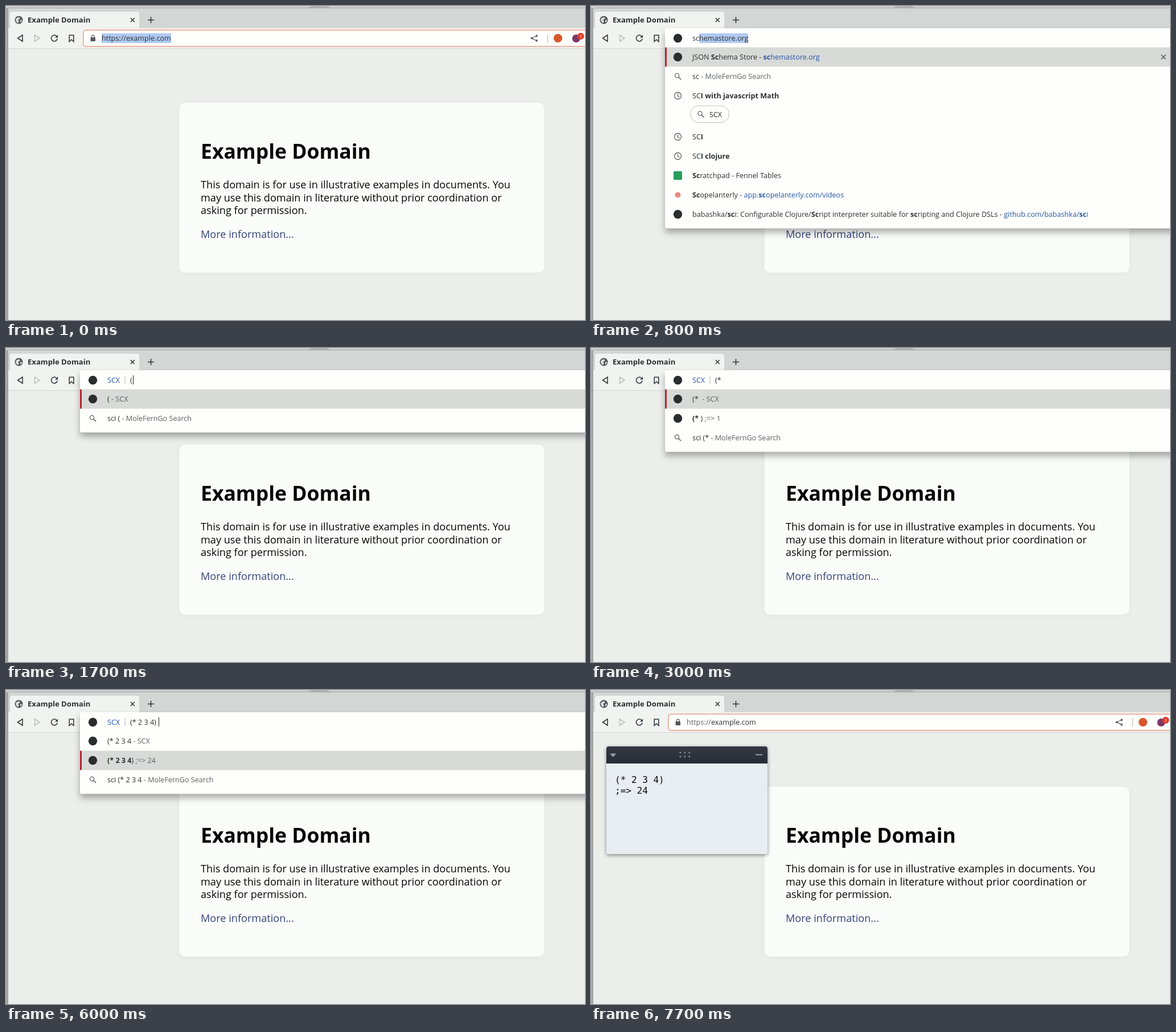
An HTML page for the animation above (8000 ms loop, 1017 by 551 pixels).

```html
<!DOCTYPE html>
<html lang="en">
<head>
<meta charset="utf-8">
<title>Example Domain</title>
<style>
  html, body { margin: 0; height: 100%; overflow: hidden; background: #eceeec; }
  svg { display: block; width: 100%; height: 100%; }
  text { font: 500 12.6px "Open Sans", "Noto Sans", sans-serif; fill: #2c2f32; white-space: pre; }
  .b { font-weight: 650; }
  .g { fill: #5c5f62; }
  .l { fill: #2756a4; }
  .line { fill: none; stroke: #2e3235; stroke-width: 1.5; }
  .soft { fill: none; stroke: #606366; stroke-width: 1.3; }
  .page text { font-size: 18.13px; fill: #050505; }
  .page .h { font-size: 35.5px; font-weight: 700; }
  .page .more { fill: #344378; }
  .mono { font: 16px "DejaVu Sans Mono", monospace; fill: #0a0a0a; }
  .drop { filter: drop-shadow(0 7px 6px rgba(0, 0, 0, .32)); }
  .popup { filter: drop-shadow(0 2px 3px rgba(0, 0, 0, .45)); }
  .card { filter: drop-shadow(0 2px 4px rgba(0, 0, 0, .03)); }
</style>
</head>
<body>
<svg viewBox="0 0 1017 551" preserveAspectRatio="none">
  <defs>
    <linearGradient id="bar" x2="0" y2="1">
      <stop stop-color="#343944"/><stop offset="1" stop-color="#272b35"/>
    </linearGradient>
    <linearGradient id="edge">
      <stop stop-color="#b2b3b2"/><stop offset="1" stop-color="#949594"/>
    </linearGradient>
  </defs>

  <!-- desktop edge and window -->
  <rect width="4" height="551" fill="url(#edge)"/>
  <rect width="1017" height="4" fill="#cdcecd"/>
  <path d="M531 4Q533 0 540 0H563L572 4Z" fill="#b0b1b0"/>
  <path d="M3.5 551V8Q3.5 3.5 8 3.5H1017" fill="none" stroke="#a2a4a3"/>
  <path d="M4 551V9Q4 4 9 4H1017V551Z" fill="#eceeec"/>
  <path d="M4 39V9Q4 4 9 4H1017V39Z" fill="#d2d6d5"/>
  <path d="M4 39H7V14Q7 10 11 10H230Q234 10 234 14V39H1017V74H4Z" fill="#f1f3f0"/>
  <path d="M4 74.5H1017" stroke="#d3d5d3"/>

  <!-- tab -->
  <circle cx="22.5" cy="24.5" r="7" fill="#505457"/>
  <path d="M17 23Q19 20 23 19.5L25 22 21 24.5 23 27 21 30Q17 28 17 23ZM25 25L28 24Q28 28 25 29Z" fill="#dfe2e0"/>
  <text x="38" y="29" class="b" style="font-size:13.1px">Example Domain</text>
  <path class="line" d="M218.8 21L225.8 28M225.8 21L218.8 28M249 24.5H260M254.5 19V30"/>

  <!-- toolbar -->
  <path class="line" d="M29 51V62L20.5 56.5Z"/>
  <path class="line" d="M50.5 51V62L59 56.5Z" style="stroke:#bcbfbc"/>
  <path class="line" d="M88.5 52.5A5.4 5.4 0 1 0 90.2 57.5"/>
  <path d="M86 55.5H91V50.5Z" fill="#2e3235"/>
  <path class="line" d="M111.2 51.3H118.8V62.5L115 59 111.2 62.5Z"/>

  <g class="page">
    <rect class="card" x="304.5" y="169.8" width="641" height="298" rx="10" fill="#fafcfa"/>
    <text class="h" x="342" y="268">Example Domain</text>
    <text x="342" y="320">This domain is for use in illustrative examples in documents. You</text>
    <text x="342" y="342.5">may use this domain in literature without prior coordination or</text>
    <text x="342" y="365">asking for permission.</text>
    <text class="more" x="342" y="406.5">More information...</text>
  </g>
  <g id="ui"></g>
</svg>
<script>
const LOOP = 8000, ROW = 34, CHIP = 38, ICON_X = 152.5;
const ENGINE = ' - MoleFernGo Search';

const span = cls => s => `<tspan class="${cls}">${s}</tspan>`;
const b = span('b'), g = span('g'), l = span('l');
const text = (x, y, s) => `<text x="${x}" y="${y}">${s}</text>`;
const dot = (x, y, r, fill) => `<circle cx="${x}" cy="${y}" r="${r}" fill="${fill}"/>`;
const rect = (x, y, w, h, fill, more = '') =>
  `<rect x="${x}" y="${y}" width="${w}" height="${h}" fill="${fill}" ${more}/>`;
const caretAt = x => rect(Math.round(x), 48, 1, 16, '#222');

// Advance of typed text in the address field
const advance = { '(': 4.5, ')': 4.5, ' ': 3.3, s: 6, c: 6, i: 3.2 };
const widthOf = s => [...s].reduce((w, ch) => w + (advance[ch] || 7), 0);

const icons = {
  search: (x, y) => `<g class="soft"><circle cx="${x - 1.5}" cy="${y - 1.5}" r="3.6"/>
    <path d="M${x + 1} ${y + 1}l4.5 4.5" stroke-width="1.7"/></g>`,
  clock: (x, y) => `<g class="soft"><circle cx="${x}" cy="${y}" r="6"/>
    <path d="M${x} ${y - 3.5}v4l3 2"/></g>`,
  dark: (x, y) => dot(x, y, 7.7, '#2b2c2d'),
  sheet: (x, y) => rect(x - 7.5, y - 7.5, 15, 15, '#2a9d5c', 'rx="1.5"'),
  pink: (x, y) => dot(x, y, 5, '#e58b85'),
};

// Suggestion rows: { icon, html, chip, close }
const highlight = (q, s) => s.replace(new RegExp('\\b' + q, 'gi'), b);
const site = (q, icon, title, url) =>
  ({ icon, html: highlight(q, title) + (url ? ' - ' + l(highlight(q, url)) : '') });
const past = (q, s) => ({ icon: 'clock', html: s.slice(0, q.length) + b(s.slice(q.length)) });
const find = q => ({ icon: 'search', html: q + g(ENGINE) });
const repo = q => site(q, 'dark',
  'babashka/sci: Configurable Clojure/Script interpreter suitable for scripting and Clojure DSLs',
  'github.com/babashka/sci');

const firstRows = (q, chip) => [
  { ...site(q, 'dark', 'JSON Schema Store', 'schemastore.org'), close: true },
  find(q),
  { ...past(q, 'SCI with javascript Math'), chip },
  past(q, 'SCI'),
  past(q, 'SCI clojure'),
  site(q, 'sheet', 'Scratchpad - Fennel Tables'),
  site(q, 'pink', 'Scopelanterly', 'app.scopelanterly.com/videos'),
  repo(q),
];
const sciRows = [
  { ...find('sci'), chip: true },
  ...['with javascript Math', 'clojure', 'clojurescript', 'babashka', 'interpreter', 'playground']
    .map(s => past('sci', 'SCI ' + s)),
  repo('sci'),
];

function dropdown(icon, field, rows, selected = 0) {
  let y = 72.5, out = '';
  rows.forEach((row, i) => {
    const h = row.chip ? ROW + CHIP : ROW, mid = y + ROW / 2;
    if (i === selected)
      out += rect(130, y, 887, h, '#d8dad8') + rect(130, y, 3, h, '#b3262e', 'rx="1"');
    out += icons[row.icon](ICON_X, mid) + text(178, mid + 4.5, row.html);
    if (row.close)
      out += `<path class="line" d="M1001.5 ${mid - 4}l8 8m0-8l-8 8" style="stroke:#505356"/>`;
    if (row.chip)
      out += rect(174.5, mid + 17.5, 68, 29.5, '#fefffc', 'rx="14.7" stroke="#bdc0bd"')
        + icons.search(193, mid + 32.5) + text(208, mid + 37, 'SCX');
    y += h;
  });
  return `<g class="drop">${rect(130, 39, 900, y + 7.7 - 39, '#fefffc', 'rx="3"')}</g>`
    + out + icons[icon](ICON_X, 56.5) + field;
}

// Field with inline completion of the rest of the address
const completing = (q, chip) => {
  const x = 178 + widthOf(q);
  return dropdown('dark', rect(x, 48, 276 - x, 17, '#afcaf1')
    + text(178, 61, q + 'schemastore.org'.slice(q.length)), firstRows(q, chip));
};

const keyword = (input, rows, caret = true, selected = 0) => dropdown('dark',
  text(178, 61, l('SCX')) + rect(208.5, 49.5, 1, 14, '#b5b8b5') + text(218, 61, input)
  + (caret ? caretAt(218 + widthOf(input)) : ''), rows, selected);

// Expression typed so far, the part already evaluated and its value
function expr(input, done, value, caret = true) {
  const rows = [{ icon: 'dark', html: input + g(' - SCX') }, find('sci ' + input.trim())];
  if (done) rows.splice(1, 0, { icon: 'dark', html: b(done) + ')' + g(' ;=&gt; ' + value) });
  return keyword(input, rows, caret);
}
const picked = caret => keyword('(* 2 3 4) ', [
  { icon: 'dark', html: '(* 2 3 4' + g(' - SCX') },
  { icon: 'dark', html: b('(* 2 3 4') + ')' + g(' ;=&gt; 24') },
  find('sci (* 2 3 4'),
], caret, 1);

function address(selected, caret) {
  return rect(135.8, 42.4, 900, 28.4, '#fefffc', 'rx="4" stroke="#eda696" stroke-width="1.7"')
    + rect(148.5, 55, 8.5, 7, '#55585b', 'rx="1"')
    + '<path class="soft" d="M150.5 55V53.5a2.3 2.3 0 0 1 4.6 0V55"/>'
    + (selected ? rect(168, 48, 122, 17, '#afcaf1') : '')
    + text(168, 61, (selected ? 'https://' : g('https://')) + 'example.com')
    + (caret ? caretAt(228.5) : '')
    + '<path class="soft" d="M932 52.5L923.5 56.5 932 60.8"/>'
    + [[932, 52.5], [923.5, 56.5], [932, 60.8]].map(([x, y]) => dot(x, y, 2, '#606366')).join('')
    + rect(951, 50, 1, 14, '#c3b1a9')
    + dot(969.5, 56.5, 7.6, '#d6582a') + dot(1001.5, 57, 7, '#7d3868')
    + dot(1009.5, 53, 6, '#e0402f')
    + '<text x="1007.5" y="56" style="font-size:8px;fill:#fff">1</text>';
}

function popup() {
  let grip = '';
  for (let i = 0; i < 6; i++)
    grip += rect(155.5 + i % 3 * 8, 108.5 + (i > 2) * 7, 2.6, 2.6, '#8a8f99');
  return `<g class="popup">${rect(27, 99, 283, 189, '#e8edf1', 'rx="4"')}</g>
    <path d="M27 129V103Q27 99 31 99H306Q310 99 310 103V129Z" fill="url(#bar)"/>
    <path d="M33.5 111.5H44L40 117H37.5Z" fill="#989da6"/>${grip}
    ${rect(289, 112.5, 12, 2, '#989da6')}
    <text class="mono" x="42" y="163">(* 2 3 4)</text>
    <text class="mono" x="42" y="182">;=&gt; 24</text>`;
}

const steps = [
  [0, address(true)],
  [500, completing('s')],
  [800, completing('sc', true)],
  [1200, dropdown('search', text(178, 61, 'sci') + caretAt(178 + widthOf('sci')), sciRows)],
  [1400, keyword('', [{ icon: 'dark', html: g('- SCX') }, ...sciRows.slice(1)])],
  [1700, expr('(')],
  [2000, expr('(', '(', '()')],
  [2200, expr('(*', '(*', 1)],
  [2500, expr('(* ', '(*', 1)],
  [3000, expr('(* ', '(* ', 1, false)],
  [3200, expr('(* 2', '(* 2', 2)],
  [3600, expr('(* 2 ', '(* 2', 2)],
  [4000, expr('(* 2 3', '(* 2 3', 6)],
  [4500, expr('(* 2 3 ', '(* 2 3 ', 6)],
  [5000, expr('(* 2 3 4', '(* 2 3 ', 6)],
  [5100, expr('(* 2 3 4', '(* 2 3 4', 24)],
  [5600, expr('(* 2 3 4', '(* 2 3 4', 24, false)],
  [6000, picked(true)],
  [6400, picked(false)],
  [6900, picked(true)],
  [7200, address(false, true)],
  [7300, address(false, true) + popup()],
  [7700, address(false, false) + popup()],
];

const ui = document.getElementById('ui');
let shown;
function draw() {
  const t = performance.now() % LOOP;
  const step = steps.findLast(([start]) => start <= t);
  if (step !== shown) ui.innerHTML = step[1];
  shown = step;
  requestAnimationFrame(draw);
}
draw();
</script>
</body>
</html>
```
